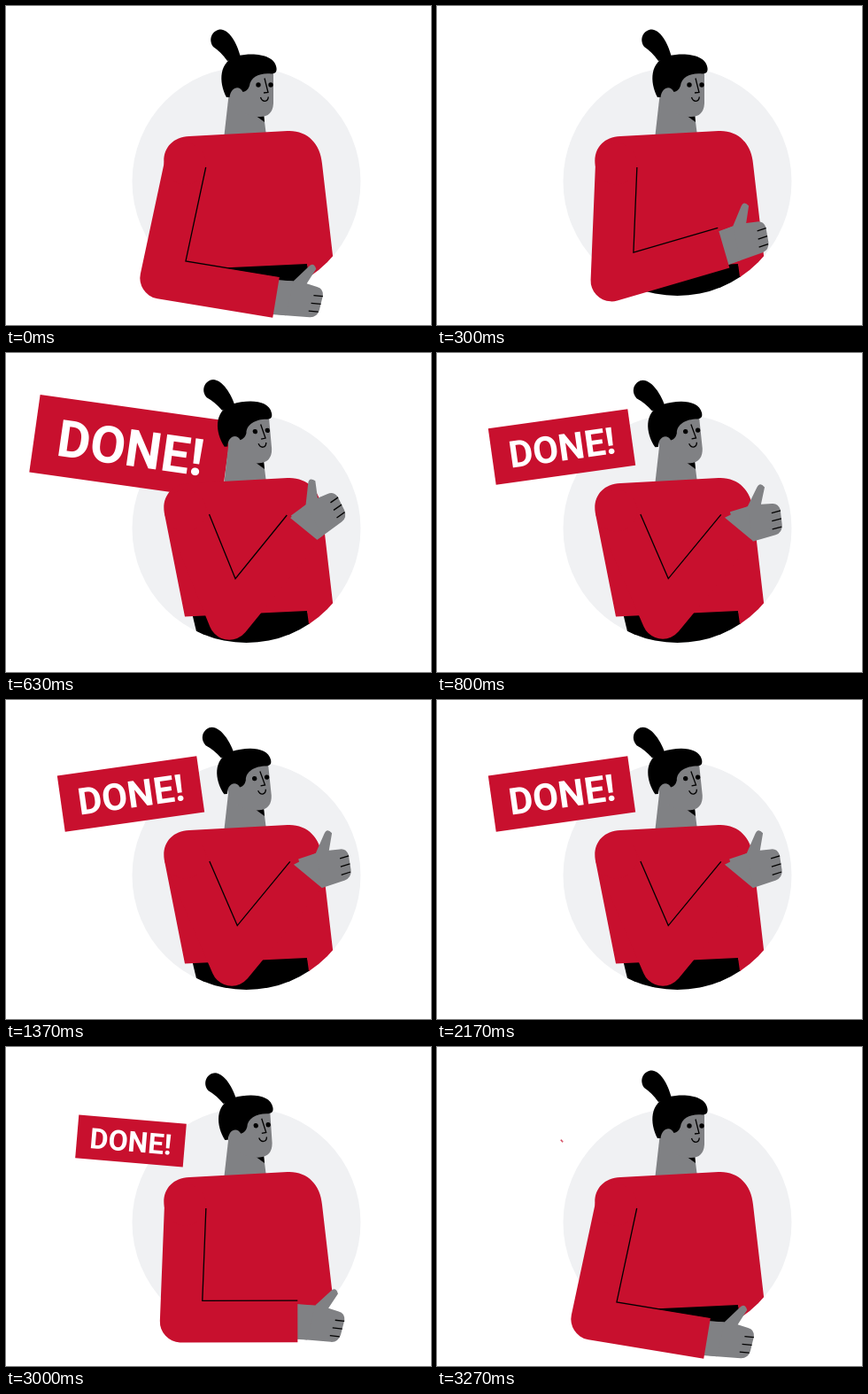
Write an HTML page that moves like this. It is 480 px wide and 360 px high and loops after 3310 ms.

```html
<!DOCTYPE html>
<html lang="en">
<head>
<meta charset="utf-8">
<title>Done</title>
<style>
  html, body { margin: 0; width: 100%; height: 100%; overflow: hidden; background: #fff; }
  svg { display: block; width: 100vw; height: 100vh; }
  .red { fill: #c8102e; }
  .skin { fill: #808184; }
  .line { fill: none; stroke: #000; stroke-width: 1.3; }
  text { font: 700 42px Roboto, "Open Sans", sans-serif; fill: #fff; text-anchor: middle; }
</style>
</head>
<body>
<svg viewBox="0 0 480 360">
  <clipPath id="disc"><circle cx="271.5" cy="198" r="129"/></clipPath>
  <circle cx="271.5" cy="198" r="129" fill="#f0f1f3"/>

  <g id="sign">
    <rect class="red" x="-79.5" y="-32" width="159" height="64"/>
    <text y="15.5">DONE!</text>
  </g>

  <path class="skin" d="M253 88L246 150H294.500L290 115Z"/>
  <path d="M281 123L291 121.500L292 131Z"/>

  <g clip-path="url(#disc)">
    <path d="M208 285H339L350 335H220Z"/>
    <path class="red" d="M202 297.500L178.700 180C176 162 187 148 207 147L318 141C340 140 355 155 357 178L370 290V335H346L340 291Z"/>
  </g>

  <g id="head">
    <path class="skin" d="M252 84L302 72V110Q301 125 287 125Q266 126 254 106Z"/>
    <path d="M249 103C240 86 240 62 262 56C281 52 304 55 305.500 70C306 75 304 76 300 76.500C287 75 276 80 275 90Q273 96 267.500 97C264 89 254 91 252.500 103Z"/>
    <path d="M250 62Q243 52 234 46C227 36 235 26 243 26.500C254 28 262 45 265 58Z"/>
    <circle cx="285" cy="89" r="2.700"/>
    <circle cx="299" cy="89" r="2.700"/>
    <path class="line" d="M292 81.500L296 97.500L291 98M287.500 103Q289 107.500 292.500 107.300Q296 107 296.300 102.500"/>
  </g>

  <path id="hand" class="skin" d="M-3 -19.500L17.700 -20L33.500 -38Q38.500 -44 42 -36L33 -18.500L45 -16Q52 -15 52.500 -7L50 10Q48 18.500 40 19L13 19.500L-3 19Z"/>
  <path id="palm" class="skin"/>
  <path id="fingers" class="line" d="M42 -6H52.500M40 3H51M38 12H49"/>
  <path id="sleeve" fill="none" stroke="#c8102e" stroke-width="47" stroke-linejoin="round"/>
  <circle class="red" cx="202.500" cy="178" r="23.500"/>
  <path id="crease" class="line"/>
</svg>

<script>
const LOOP = 3310, UPPER = 132, FORE = 132, HALF = 23.5;
const SHOULDER = [202.5, 178], CREASE_TOP = 182, RAD = Math.PI / 180;

const $ = id => document.getElementById(id);
const set = (id, name, value) => $(id).setAttribute(name, value);

// Progress from 0 to 1 between two times: linear, soft at both ends, with overshoot
const ramp = (t, from, to) => Math.min(1, Math.max(0, (t - from) / (to - from)));
const ease = (t, from, to) => { const u = ramp(t, from, to); return u * u * (3 - 2 * u); };
const back = (t, from, to, pull) => {
  const v = ramp(t, from, to) - 1;
  return 1 + (pull + 1) * v ** 3 + pull * v * v;
};
const mix = (a, b, u) => a + (b - a) * u;

const dir = angle => [Math.cos(angle * RAD), Math.sin(angle * RAD)];
const normal = ([x, y]) => [-y, x];
const move = (p, v, d) => [p[0] + v[0] * d, p[1] + v[1] * d];
const poly = points => "M" + points.map(p => p.map(n => n.toFixed(2)).join(" ")).join("L");

function drawArm(upper, fore, bend) {
  const u = dir(upper), f = dir(fore), outU = normal(u), outF = normal(f);
  const elbow = move(SHOULDER, u, UPPER), wrist = move(elbow, f, FORE);

  // The crease follows the inner edges of both sleeve halves to where they cross
  const miter = HALF / (1 + outU[0] * outF[0] + outU[1] * outF[1]);
  const fold = move(elbow, [outU[0] + outF[0], outU[1] + outF[1]], -miter);
  const top = move(fold, u, (CREASE_TOP - fold[1]) / u[1]);
  set("sleeve", "d", poly([SHOULDER, elbow, wrist]));
  set("crease", "d", poly([top, fold, move(wrist, outF, -HALF)]));

  // The palm joins the cuff to the turned hand
  const turn = fore + bend, h = dir(turn), side = normal(h);
  const cuff = move(wrist, f, -2);
  const at = (x, y) => move(move(wrist, h, x), side, y);
  set("palm", "d", poly([move(cuff, outF, 20), move(cuff, outF, -19), at(17.7, -20), at(13, 19.5)]) + "Z");
  for (const id of ["hand", "fingers"]) {
    set(id, "transform", `translate(${wrist}) rotate(${turn})`);
  }
}

function draw(t) {
  // Arm: swing up to the chest, unfold into a thumbs-up, then drop
  const swing = ease(t, 70, 600), unfold = ease(t, 520, 660);
  const drop = ease(t, 2553, 3239);
  drawArm(
    mix(mix(mix(102.1, 78, swing), 66.6, unfold), 102.1, drop),
    mix(mix(mix(9.4, -54, swing), -50.5, unfold), 9.4, ease(t, 2722, 3095)),
    mix(mix(mix(-4, 0, swing), 33, back(t, 570, 1070, 1.7)), -4, drop)
  );

  const tilt = -6 * (ease(t, 510, 670) - ease(t, 2920, 3120));
  set("head", "transform", `rotate(${tilt} 279 130)`);

  const leave = ease(t, 2860, LOOP);
  const scale = Math.max(0, back(t, 485, 804, 4)) * (1 - leave);
  const angle = -8 + 66 * (1 - ease(t, 485, 700)) + 55 * leave;
  set("sign", "transform", `translate(141 106) rotate(${angle}) scale(${scale})`);
}

const start = performance.now();
function tick() {
  draw((performance.now() - start) % LOOP);
  requestAnimationFrame(tick);
}
tick();
</script>
</body>
</html>
```
